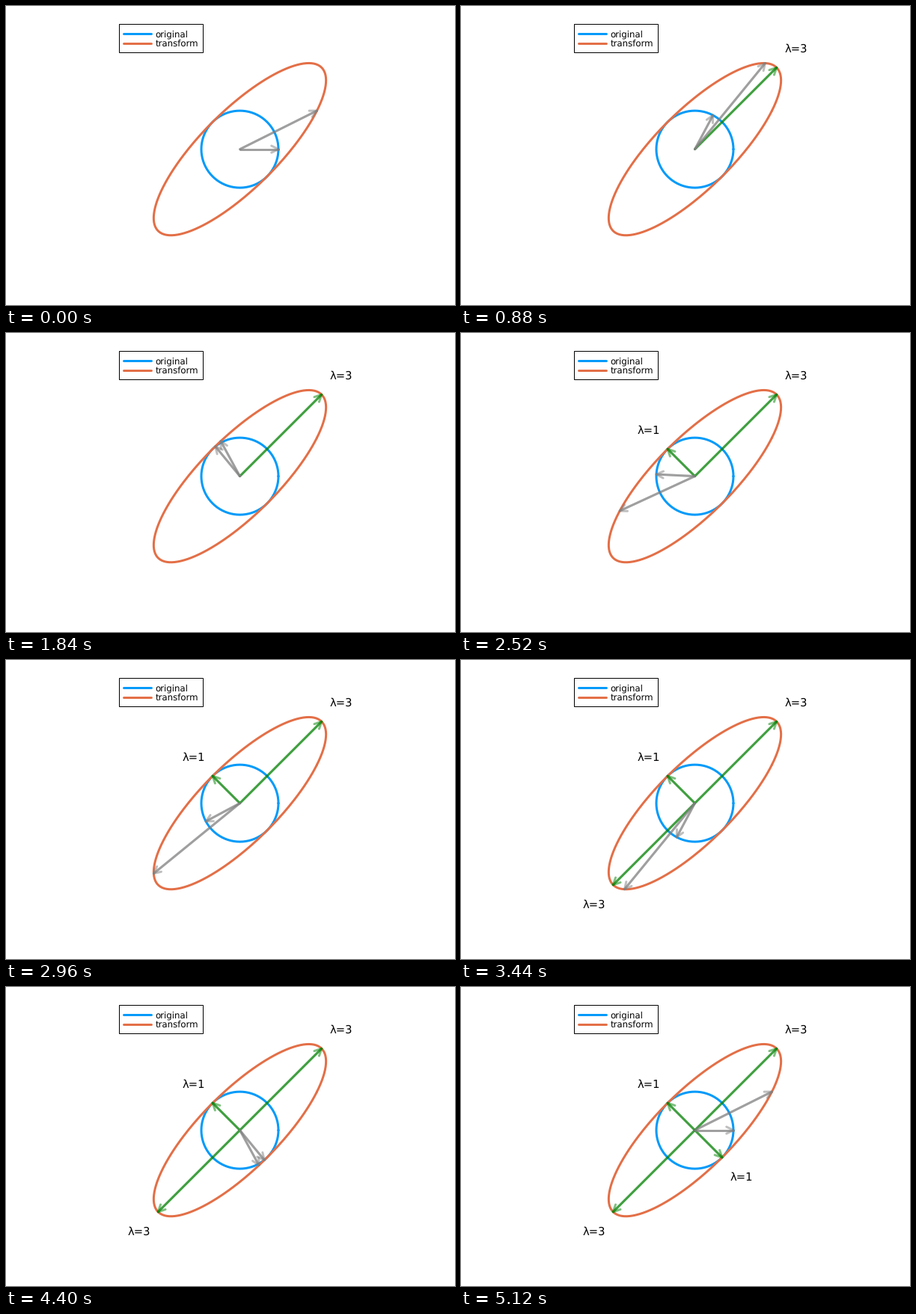
Write a matplotlib script that moves like this. It is 600 px wide and 400 px high and loops after 5160 ms.

```python
import numpy as np
import matplotlib.pyplot as plt
from matplotlib.animation import FuncAnimation
from matplotlib.patches import Rectangle

plt.rcParams["font.family"] = "DejaVu Sans"
plt.rcParams["text.hinting"] = "none"

W, H, DPI = 600, 400, 100
PX = 72 / DPI                        # points per pixel
FRAMES, INTERVAL = 129, 40
CENTER, UNIT = np.array([312.5, 191.6]), 51.5
A = np.array([[2, 1], [1, 2]])
BLUE, ORANGE = "#009AFA", "#E36F47"
HEAD_LEN, HEAD_HALF = 9.3, 4.6

fig = plt.figure(figsize=(W / DPI, H / DPI), dpi=DPI, facecolor="white")
ax = fig.add_axes([0, 0, 1, 1])
ax.set_xlim(0, W)
ax.set_ylim(H, 0)
ax.axis("off")


def to_px(v):
    """Map plane coordinates (..., 2) to stage pixels."""
    return CENTER + UNIT * np.asarray(v) * [1, -1]


def direction(angle):
    return np.stack([np.cos(angle), np.sin(angle)], axis=-1)


def stroke(points=((0, 0),), **style):
    x, y = np.transpose(points)
    return ax.plot(x, y, lw=3 * PX, solid_capstyle="round",
                   solid_joinstyle="round", **style)[0]


class Arrow:
    """Translucent vector from the origin: doubled shaft and open head."""

    def __init__(self, color, z):
        self.parts = [stroke(color=color, alpha=0.5, zorder=z) for _ in range(3)]

    def point_to(self, v):
        tip = to_px(v)
        d = (tip - CENTER) / np.hypot(*(tip - CENTER))
        side = HEAD_HALF * np.array([-d[1], d[0]])
        back = tip - HEAD_LEN * d
        shaft = [CENTER, tip]
        head = [back + side, tip, back - side]
        for line, pts in zip(self.parts, (shaft, shaft, head)):
            line.set_data(*np.transpose(pts))


# circle and its image
circle = direction(np.linspace(0, 2 * np.pi, 241))
stroke(to_px(circle), color=BLUE, zorder=2)
stroke(to_px(circle @ A.T), color=ORANGE, zorder=3)

# legend
ax.add_patch(Rectangle((151, 24), 112, 38, fc="white", ec="black", lw=PX, zorder=8))
for y, color, name in ((36.9, BLUE, "original"), (49.8, ORANGE, "transform")):
    stroke([(157, y), (194, y)], color=color, zorder=9)
    ax.text(199.4, y + 4.3, name, fontsize=11.75 * PX, zorder=9)

# eigenvectors, each with the step at which it is reached
eigen = []
for k in range(4):
    lam = 1 if k % 2 else 3
    v = lam * direction(np.pi / 4 + k * np.pi / 2)
    arrow = Arrow("green", 4)
    arrow.point_to(v)
    x, y = to_px(v + 0.5 * np.sign(v))
    label = ax.text(x, y + 5.3, f"λ={lam}", fontsize=14.7 * PX, ha="center", zorder=7)
    eigen.append((16 + 32 * k, arrow.parts + [label]))

vector, image = Arrow("gray", 5), Arrow("gray", 6)


def update(i):
    u = direction(2 * np.pi * i / (FRAMES - 1))
    vector.point_to(u)
    image.point_to(A @ u)
    for step, artists in eigen:
        for artist in artists:
            artist.set_visible(i >= step)
    return []


anim = FuncAnimation(fig, update, frames=FRAMES, interval=INTERVAL,
                     repeat=True, repeat_delay=0)
plt.show()
```
